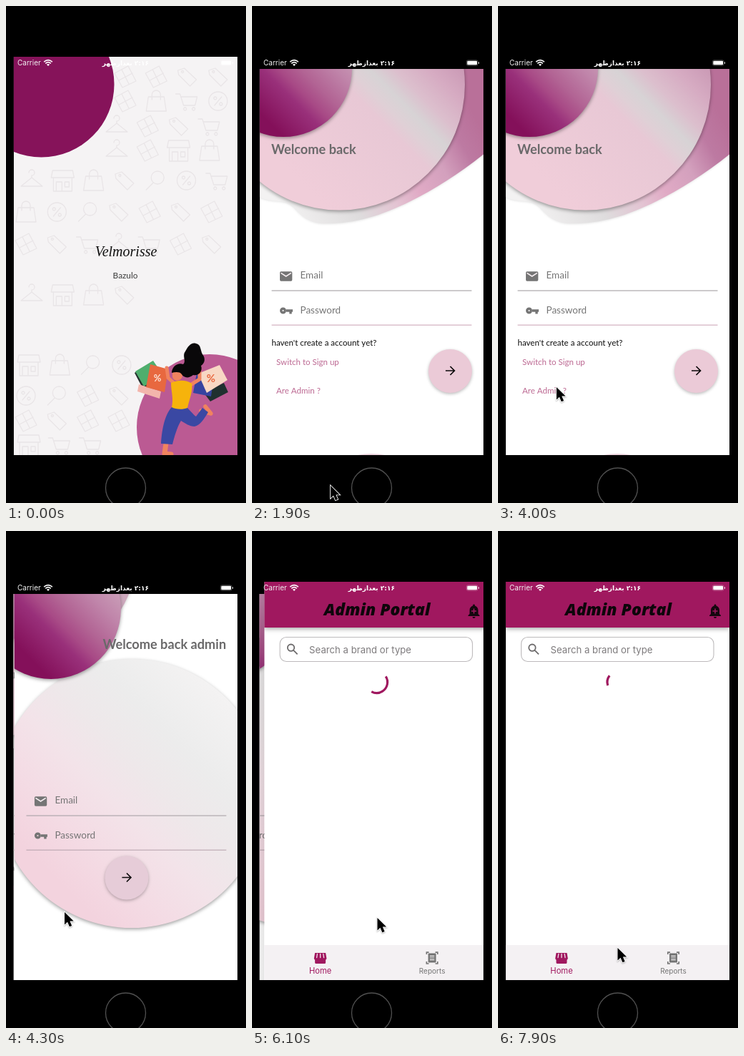
Animation, 336 px wide and 695 px high, one loop 8 s. Source, as an HTML page with a canvas:

```html
<!DOCTYPE html>
<html lang="en">
<head>
<meta charset="utf-8">
<title>Shop app walkthrough</title>
<style>
html, body { margin: 0; width: 100%; height: 100%; overflow: hidden; background: #000; }
canvas { display: block; width: 336px; height: 695px; }
</style>
</head>
<body>
<canvas id="stage"></canvas>
<script>
const W = 336, H = 695, LOOP = 8000;
const L = 10.6, R = 324, TOP = 71, BAR = 88, BOTTOM = 628;
const canvas = document.getElementById('stage');
const ratio = window.devicePixelRatio || 1;
canvas.width = W * ratio;
canvas.height = H * ratio;
const c = canvas.getContext('2d');

const LATO = 'Lato, sans-serif', UI = 'Inter, sans-serif';
const GREY = '#757575', MAROON = '#a0185f', INK = '#6a696a';

// ---------- helpers ----------
function rect(x, y, w, h, fill) {
  c.fillStyle = fill;
  c.fillRect(x, y, w, h);
}
function disc(x, y, r, fill) {
  c.beginPath();
  c.arc(x, y, r, 0, Math.PI * 2);
  c.fillStyle = fill;
  c.fill();
}
function shadowed(blur, dy, alpha, draw) {
  c.save();
  c.shadowColor = `rgba(0,0,0,${alpha})`;
  c.shadowBlur = blur * ratio;
  c.shadowOffsetY = dy * ratio;
  draw();
  c.restore();
}
function shape(d, fill) {
  c.fillStyle = fill;
  c.fill(new Path2D(d));
}
function stroke(d, color, width) {
  c.strokeStyle = color;
  c.lineWidth = width;
  c.stroke(new Path2D(d));
}
function text(str, x, y, font, color, align = 'left') {
  c.font = font;
  c.fillStyle = color;
  c.textAlign = align;
  c.fillText(str, x, y);
}
// stops: alternating position, colour
function blend(x0, y0, x1, y1, ...stops) {
  const g = c.createLinearGradient(x0, y0, x1, y1);
  for (let i = 0; i < stops.length; i += 2) g.addColorStop(stops[i], stops[i + 1]);
  return g;
}
// disc shaded from the bottom left to the top right of its box
function shadedDisc(x, y, r, ...stops) {
  shadowed(5, 2, 0.36, () => disc(x, y, r, blend(x - r, y + r, x + r, y - r, ...stops)));
}
function at(x, y, draw, scale = 1) {
  c.save();
  c.translate(x, y);
  c.scale(scale, scale);
  draw();
  c.restore();
}
function bezier(x1, y1, x2, y2) {
  const f = (a, b, u) => 3 * a * u * (1 - u) ** 2 + 3 * b * u * u * (1 - u) + u ** 3;
  return t => {
    if (t <= 0) return 0;
    if (t >= 1) return 1;
    let lo = 0, hi = 1;
    for (let i = 0; i < 24; i++) {
      const m = (lo + hi) / 2;
      if (f(x1, x2, m) < t) lo = m; else hi = m;
    }
    return f(y1, y2, lo);
  };
}
const pushEase = bezier(0.35, 0.91, 0.33, 0.97);
const arcEase = bezier(0.4, 0, 0.2, 1);

// ---------- splash ----------
const ICONS = {
  B: 'M-11-6H11L14 14H-14ZM-6-2V-9a6 6 0 0 1 12 0V-2',
  P: 'M-13 0a13 13 0 1 0 26 0a13 13 0 1 0-26 0M5-6L-5 6M-6-4a2 2 0 1 0 4 0a2 2 0 1 0-4 0M2 4a2 2 0 1 0 4 0a2 2 0 1 0-4 0',
  M: 'M-6-4a9 9 0 1 0 18 0a9 9 0 1 0-18 0M-3 3L-13 13',
  S: 'M-14-14H14L16-4H-16ZM-13-4V15H13V-4M-9 15V2H-1V15M3 2H9V9H3Z',
  H: 'M0-4V-7a4 4 0 1 0-4-4M0-4L15 8H-15Z',
  T: 'M-13-9L-4-12L13 4L4 13L-12-3ZM-8-7a1.5 1.5 0 1 0 3 0a1.5 1.5 0 1 0-3 0',
  G: 'M-15-5L4-15L15 6L-4 15ZM-9 5L10-5M-5-10L5 10',
  C: 'M-16-10H-10L-5 6H11L14-6H-8M-3 9a2 2 0 1 0 .1 0M9 9a2 2 0 1 0 .1 0'
};
const ROWS = [
  [99, 167, 'GGTT'], [133, 167, 'GBCP'], [168, 155, 'HGTC'], [202, 155, 'HGSB'],
  [244, 36, 'HSBTMPC'], [288, 28, 'BPMTGTG'], [333, 28, 'GTCHCGT'],
  [404, 36, 'HSBT'], [502, 32, 'SBMP'], [545, 28, 'PMGT'], [580, 28, 'GTGG'], [614, 32, 'SCC']
];
function shopper() {
  // bags on the left
  shape('M180 513L205 497L217 517L192 536Z', '#26302f');
  shape('M181 511L206 496L219 515L193 532Z', '#4fae6d');
  shape('M186 529L217 539L215 549L184 539Z', '#f3b5ac');
  shape('M202 501L227 508L222 540L196 533Z', '#e8683f');
  text('%', 212, 525, 'bold 13px Lato, sans-serif', '#fde6dc', 'center');
  // bags on the right
  shape('M277 541L305 527L311 540L286 553Z', '#20302f');
  shape('M267 513L291 520L287 546L262 541Z', '#3543a0');
  shape('M269 514L299 502L310 523L281 541Z', '#f8d8c4');
  text('%', 287, 526, 'bold 15px Lato, sans-serif', '#e8683f', 'center');
  c.lineCap = 'round';
  c.lineJoin = 'round';
  stroke('M236 528L227 520L225 506', '#f0835f', 5);
  stroke('M258 530L271 522L271 505', '#f0835f', 5);
  // legs
  stroke('M273 566L287 570L279 560', '#f0835f', 5.5);
  stroke('M225 604L222 626L231 627', '#f0835f', 7);
  shape('M232 561C239 558 249 559 254 562C260 568 263 572 266 574L275 562L283 568C277 578 272 586 264 588C257 588 250 583 245 580C239 590 236 602 233 613L217 612C218 596 221 573 232 561Z', '#3a48a3');
  shape('M231 527C239 523 252 522 260 528C262 538 257 549 254 562C247 565 237 564 232 561C235 549 231 539 231 527Z', '#f6b30c');
  // head and hair
  shape('M233 510C238 505 248 508 247 517C246 525 235 526 233 519Z', '#f0835f');
  shape('M232 513C232 504 241 498 248 501C253 497 246 489 251 483C255 476 259 470 266 472C273 473 272 481 275 487C280 493 278 500 273 503C276 510 270 518 262 516C255 522 248 519 246 515C243 511 237 512 232 513Z', '#090809');
}
function splash() {
  rect(L, TOP, R - L, BOTTOM - TOP, '#f5f3f4');
  c.lineCap = 'round';
  c.lineJoin = 'round';
  for (const [y, x0, kinds] of ROWS)
    [...kinds].forEach((k, i) => at(x0 + i * 43.3, y, () => stroke(ICONS[k], '#e9e5e7', 1.3)));
  disc(49.5, 109.5, 102, '#86135a');
  disc(285, 589, 102, '#bb5a93');
  shopper();
  text('Velmorisse', 168, 350, 'italic 20px "Liberation Serif", serif', '#111', 'center');
  text('Bazulo', 167, 381, '11.8px ' + LATO, '#3c3c3c', 'center');
}

// ---------- sign-in pages ----------
const PLUM = [0.25, '#84105a', 0.42, '#99307a', 0.48, '#a84a86', 0.56, '#b26494', 0.69, '#c085aa', 0.8, '#c99db7'];

function sheet() {
  rect(L, TOP, R - L, BAR - TOP, '#000');
  rect(L, BAR, R - L, BOTTOM - BAR, '#fff');
  c.beginPath();
  c.rect(L, BAR, R - L, BOTTOM - BAR);
  c.clip();
}
function fields(first, second) {
  shape('M39 373a1.7 1.7 0 0 1 1.7-1.7H54.6a1.7 1.7 0 0 1 1.7 1.7V383a1.7 1.7 0 0 1-1.7 1.7H40.7a1.7 1.7 0 0 1-1.7-1.7Z', GREY);
  stroke('M40.5 373.3L47.6 378L54.8 373.3', '#f6eef1', 1.6);
  c.lineCap = 'butt';
  stroke('M40.7 426a2.8 2.8 0 1 0 5.6 0a2.8 2.8 0 1 0-5.6 0', GREY, 3.4);
  stroke('M48 426H57M54 426V430.5', GREY, 3.4);
  text('Email', 67.5, 381, '13.5px ' + LATO, GREY);
  text('Password', 67.5, 429.5, '13.5px ' + LATO, GREY);
  rect(27.5, 397.5, 280, 1.1, first);
  rect(27.5, 445.6, 280, 1.1, second);
}
function arrowButton(x, y, fill) {
  shadowed(4, 1.5, 0.28, () => disc(x, y, 30.5, fill));
  c.lineCap = 'butt';
  c.lineJoin = 'miter';
  stroke(`M${x - 6.5} ${y - 0.5}H${x + 5.5}M${x} ${y - 6.5}L${x + 6} ${y - 0.5}L${x} ${y + 5.5}`, '#0c0a0b', 1.7);
}
function login() {
  sheet();
  shadowed(3, 1, 0.1, () => shape(
    'M10 88H324V207.5C290 235 254 257 222 273C180 294 142 305 100 304C76 303 66 289 57 280C45 269 28 276 10 267Z',
    blend(50, 300, 310, 150, 0, '#f3f2f2', 0.3, '#dedcdd', 0.48, '#e3c3d2', 0.6, '#e0aac5', 0.75, '#d3a0bd', 0.88, '#bd7aa2', 1, '#b97099')));
  shadedDisc(122.5, 110, 175.5,
    0.23, '#f0cdd9', 0.51, '#e8c8d5', 0.55, '#dfd0d6', 0.59, '#d7d3d5', 0.64, '#dcbfcd', 0.71, '#d6abc2', 0.77, '#cc9cb7');
  shadedDisc(44, 87, 96, ...PLUM);
  disc(167, 726, 100, '#ecd3dd');
  text('Welcome back', 27, 206.5, 'bold 18.2px ' + LATO, INK);
  fields('#a3a0a2', '#cfa9ba');
  text("haven't create a account yet?", 27.5, 474.5, '11.55px ' + LATO, '#0d0d0d');
  text('Switch to Sign up', 34, 501.5, '11.55px ' + LATO, '#bd6a93');
  text('Are Admin ?', 34, 541.8, '11.55px ' + LATO, '#bd6a93');
  arrowButton(277.5, 510.5, '#ebcad7');
}
function adminLogin() {
  sheet();
  shadedDisc(175, 367, 188,
    0.2, '#f3d3de', 0.32, '#f4dbe4', 0.45, '#f3e3e9', 0.56, '#eee8ea', 0.68, '#ececec', 0.84, '#f3f2f2', 1, '#fbfafa');
  shadowed(4, 1, 0.2, () => disc(70, 50, 108, '#cda9bd'));
  shadedDisc(62, 109, 98, ...PLUM);
  text('Welcome back admin', 307.3, 164.5, 'bold 18.2px ' + LATO, INK, 'right');
  fields('#aaa3a7', '#b9a5b0');
  arrowButton(168, 485, '#e6ccd8');
}

// ---------- portal ----------
function spinner(ms) {
  const cycle = 1333, p = (ms % cycle) / cycle, turn = Math.PI * 1.5;
  const head = arcEase(p * 2) * turn, tail = arcEase(p * 2 - 1) * turn;
  const from = -Math.PI / 2 + tail + ms / 2222 * Math.PI * 2 + p * Math.PI / 2;
  c.beginPath();
  c.arc(168, 211.5, 15, from, from + Math.max(head - tail, 0.02));
  c.strokeStyle = MAROON;
  c.lineWidth = 3.2;
  c.lineCap = 'butt';
  c.stroke();
}
function shopIcon() {
  shape('M81.5 590H96.5L97.8 597.5a2.4 2.4 0 0 1-1.3 2.2V603.5a1.5 1.5 0 0 1-1.5 1.5H83a1.5 1.5 0 0 1-1.5-1.5V599.7a2.4 2.4 0 0 1-1.3-2.2Z', MAROON);
  c.lineCap = 'round';
  stroke('M84.8 591.5L84 596.5M89 591.5V596.5M93.2 591.5L94 596.5', '#f5e6ee', 1.3);
}
function reportIcon() {
  c.lineCap = 'butt';
  c.lineJoin = 'miter';
  stroke('M237.8 592V589.2H241M250 589.2H253.2V592M253.2 602V605H250M241 605H237.8V602', GREY, 1.7);
  shape('M241 590.5H250a1 1 0 0 1 1 1V602.5a1 1 0 0 1-1 1H241a1 1 0 0 1-1-1V591.5a1 1 0 0 1 1-1Z', GREY);
  stroke('M242.3 594.3H248.7M242.3 597H248.7M242.3 599.7H248.7', '#f4f1f3', 1.2);
}
function portal(ms) {
  rect(L, TOP, R - L, BOTTOM - TOP, '#fff');
  shadowed(6, 2, 0.35, () => rect(L, TOP, R - L, 64, MAROON));
  text('Admin Portal', 168.5, 118, 'italic 800 23px "Open Sans", sans-serif', '#0d060a', 'center');
  shape('M304 102.5a1.4 1.4 0 0 1 1.4 1.4V104.6C308.4 105.4 310 108 310 111V116L312 118V119H296V118L298 116V111C298 108 299.6 105.4 302.6 104.6V103.9A1.4 1.4 0 0 1 304 102.5ZM302 120H306a2 2 0 0 1-4 0Z', '#14070e');
  c.lineCap = 'butt';
  stroke('M304 108.5V115.5M300.5 112H307.5', MAROON, 1.5);

  c.beginPath();
  c.roundRect(32.5, 148.5, 269.5, 34, 9);
  c.strokeStyle = '#bdbabc';
  c.lineWidth = 1.1;
  c.stroke();
  stroke('M43.2 163.2a4.7 4.7 0 1 0 9.4 0a4.7 4.7 0 1 0-9.4 0M51.3 166.6L57 172.3', '#6d6b6c', 1.8);
  text('Search a brand or type', 73.5, 171, '13.2px ' + UI, '#7d7a7c');
  spinner(ms);

  rect(L, 579, R - L, BOTTOM - 579, '#f4f1f3');
  shopIcon();
  reportIcon();
  text('Home', 89, 618.5, '11.2px ' + UI, MAROON, 'center');
  text('Reports', 245.5, 618.5, '10px ' + UI, GREY, 'center');
}

// ---------- chrome ----------
function statusBar() {
  text('Carrier', 16, 83, '10px ' + UI, '#f2f2f2');
  c.lineCap = 'butt';
  stroke('M53.2 78.2Q59 73 64.8 78.2M55.3 80.4Q59 77 62.7 80.4', '#fff', 1.7);
  shape('M59 84L56.9 81.8Q59 80 61.1 81.8Z', '#fff');
  c.direction = 'rtl';
  text('۲:۱۶ بعدازظهر', 167.3, 83, 'bold 9px "DejaVu Sans", sans-serif', '#fff', 'center');
  c.direction = 'ltr';
  c.beginPath();
  c.roundRect(300.3, 75.8, 15.8, 7.4, 2.2);
  c.strokeStyle = 'rgba(255,255,255,.35)';
  c.lineWidth = 0.8;
  c.stroke();
  c.beginPath();
  c.roundRect(301.3, 76.7, 13.8, 5.6, 1.4);
  c.roundRect(316.9, 78.3, 1, 2.4, 0.5);
  c.fillStyle = '#fff';
  c.fill();
}
function onScreen(dx, draw) {
  c.save();
  c.translate(dx, 0);
  c.beginPath();
  c.rect(L, TOP, R - L, BOTTOM - TOP);
  c.clip();
  draw();
  c.restore();
}
// New page slides over the old one, which drifts left by a third.
function push(e, under, over) {
  const width = R - L, dx = (1 - e) * width;
  if (e < 1) {
    onScreen(-e * width / 3, under);
    const edge = L + dx;
    rect(edge - 16, TOP, 16, BOTTOM - TOP, blend(edge - 16, 0, edge, 0, 0, 'rgba(0,0,0,0)', 1, 'rgba(0,0,0,.1)'));
  }
  onScreen(dx, over);
}

// time, x, y of the pointer tip
const POINTER = [
  [700, 150, 697], [1300, 128, 681], [1900, 110, 670.8], [2150, 110, 669], [2700, 84, 546],
  [3100, 81, 533], [4250, 82, 533], [4500, 82, 533], [5000, 160, 487], [5200, 162.5, 485.5],
  [5850, 162.5, 486], [6100, 175.5, 541], [6200, 173, 655], [6300, 167.5, 583], [8000, 167.5, 583]
];
function pointer(t) {
  const i = POINTER.findIndex(p => p[0] > t);
  if (i < 1) return;
  const [t0, x0, y0] = POINTER[i - 1], [t1, x1, y1] = POINTER[i];
  const u = (t - t0) / (t1 - t0), k = u * u * (3 - 2 * u);
  at(x0 + (x1 - x0) * k, y0 + (y1 - y0) * k, () => {
    const d = 'M0 0V18.2L4.2 14.4L7.2 21.2L10.6 19.7L7.7 13.1H13.2Z';
    c.lineJoin = 'miter';
    shadowed(2, 1, 0.3, () => stroke(d, '#fff', 1.8));
    shape(d, '#000');
  }, 0.96);
}

function paint(t) {
  c.setTransform(ratio, 0, 0, ratio, 0, 0);
  rect(0, 0, W, H, '#000');
  c.beginPath();
  c.arc(167.5, 674, 28, 0, Math.PI * 2);
  c.strokeStyle = '#505050';
  c.lineWidth = 1.3;
  c.stroke();

  c.save();
  c.beginPath();
  c.rect(L, TOP, R - L, BOTTOM - TOP);
  c.clip();
  if (t < 1900) onScreen(0, splash);
  else if (t < 4010) onScreen(0, login);
  else if (t < 5720) push(pushEase((t - 4010) / 310), login, adminLogin);
  else push(pushEase((t - 5720) / 530), adminLogin, () => portal(Math.max(0, 250 + (t - 6100) * 0.689)));
  statusBar();
  c.restore();
  pointer(t);
}

const start = performance.now();
function tick() {
  paint((performance.now() - start) % LOOP);
  requestAnimationFrame(tick);
}
tick();
</script>
</body>
</html>
```
